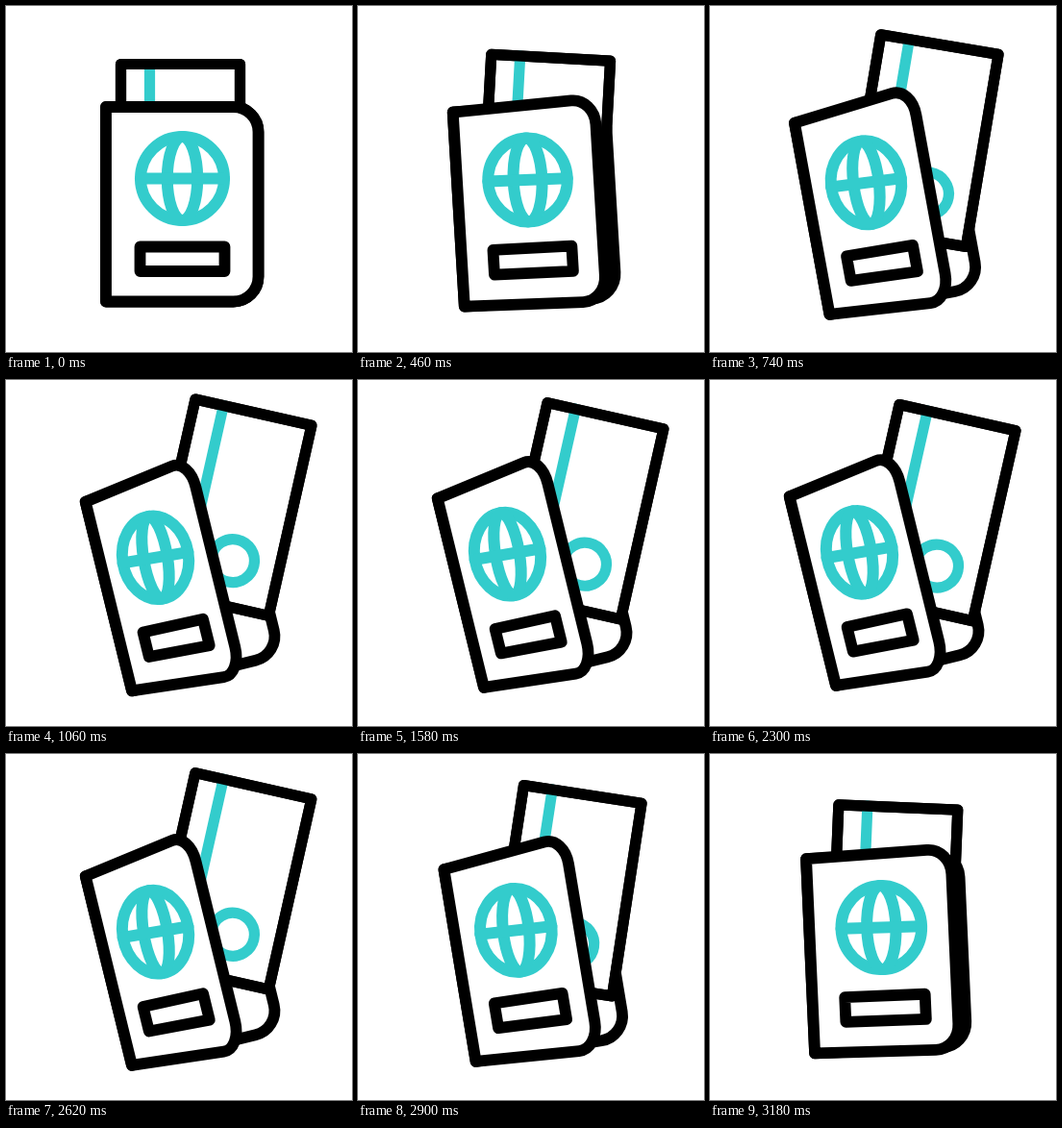
Animation of 360 by 360 pixels, one loop 3200 ms. Source, as an HTML page:

```html
<!DOCTYPE html>
<html lang="en">
<head>
<meta charset="utf-8">
<title>Passport and ticket</title>
<style>
  html, body { margin: 0; width: 100%; height: 100%; overflow: hidden; background: #fff; }
  svg { display: block; width: 100vw; height: 100vh; }
  path, rect, ellipse { stroke: #000; stroke-width: 11.2; stroke-linejoin: round; stroke-linecap: round; fill: #fff; }
  .book path { stroke-width: 11.8; }
  .accent { stroke: #33cccc; fill: none; }
  #globe .accent { stroke-width: 12; }
</style>
</head>
<body>
<svg viewBox="0 0 360 360">
  <g class="book"><path id="back"/></g>
  <g id="ticket">
    <rect width="124" height="203" stroke="none"/>
    <path class="accent" d="M30 0V203"/>
    <ellipse class="accent" cx="75" cy="155.4" rx="22.5" ry="22.5"/>
    <rect width="124" height="203" style="fill:none"/>
  </g>
  <g class="book">
    <path id="cover"/>
    <path id="label"/>
  </g>
  <g id="globe">
    <ellipse class="accent" id="rim" ry="43.5"/>
    <ellipse class="accent" id="meridian" ry="43.5"/>
    <path class="accent" id="equator"/>
  </g>
</svg>
<script>
  const LOOP = 3200, STEP = 20;
  const OPEN_AT = 200, CLOSE_AT = 2600, TURN = 800, BOB = 400, LIFT = 7;
  const W = 158.5, H = 202.5, R = 26, K = 11.6;

  const $ = id => document.getElementById(id);
  const books = document.querySelectorAll('.book');
  const mix = (a, b, p) => a + (b - a) * p;
  const clamp = u => Math.min(1, Math.max(0, u));
  const ease = u => { u = clamp(u); return u * u * (3 - 2 * u); };

  // Swings a page point around the spine: narrower, with flaring top and bottom edges.
  function swing(x, y, p) {
    const nx = x * mix(1, 0.726, p);
    const slope = mix(-0.152, 0.093, y / H) * p;
    return `${nx.toFixed(2)} ${(y + slope * nx).toFixed(2)} `;
  }

  function pagePath(p) {
    const at = (x, y) => swing(x, y, p);
    return 'M' + at(0, 0) + 'L' + at(W - R, 0) +
      'C' + at(W - K, 0) + at(W, K) + at(W, R) +
      'L' + at(W, H - R) +
      'C' + at(W, H - K) + at(W - K, H) + at(W - R, H) +
      'L' + at(0, H) + 'Z';
  }

  function labelPath(p) {
    const at = (x, y) => swing(x, y, p);
    return 'M' + at(35.5, 145.5) + 'L' + at(123.5, 145.5) +
      'L' + at(123.5, 171) + 'L' + at(35.5, 171) + 'Z';
  }

  const place = (el, x, y, angle) =>
    el.setAttribute('transform', `translate(${x} ${y}) rotate(${angle})`);

  function draw(t) {
    const p = ease((t - OPEN_AT) / TURN) - ease((t - CLOSE_AT) / TURN);

    // Two rises and falls while the book is open.
    const beat = Math.min(4, Math.max(0, (t - OPEN_AT - TURN) / BOB)) % 2;
    const lift = LIFT * ease(beat < 1 ? beat : 2 - beat);

    for (const book of books) {
      place(book, mix(104, 82.7, p), mix(105, 127.2, p) - lift, -13.8 * p);
    }
    place($('ticket'), mix(119.5, 197, p), mix(60.5, 19.6, p) + lift, 12.7 * p);
    place($('globe'), mix(183.5, 155.5, p), mix(179.5, 185.2, p) - lift, -9.5 * p);

    $('cover').setAttribute('d', pagePath(p));
    $('label').setAttribute('d', labelPath(p));

    const squeeze = mix(1, 0.79, p);
    $('rim').setAttribute('rx', 43.5 * squeeze);
    $('meridian').setAttribute('rx', 15.7 * squeeze);
    $('equator').setAttribute('d', `M${-43.5 * squeeze} 0H${43.5 * squeeze}`);
  }

  $('back').setAttribute('d', pagePath(0));

  const start = performance.now();
  function tick() {
    const t = (performance.now() - start) % LOOP;
    draw(Math.floor(t / STEP) * STEP);
    requestAnimationFrame(tick);
  }
  tick();
</script>
</body>
</html>
```
